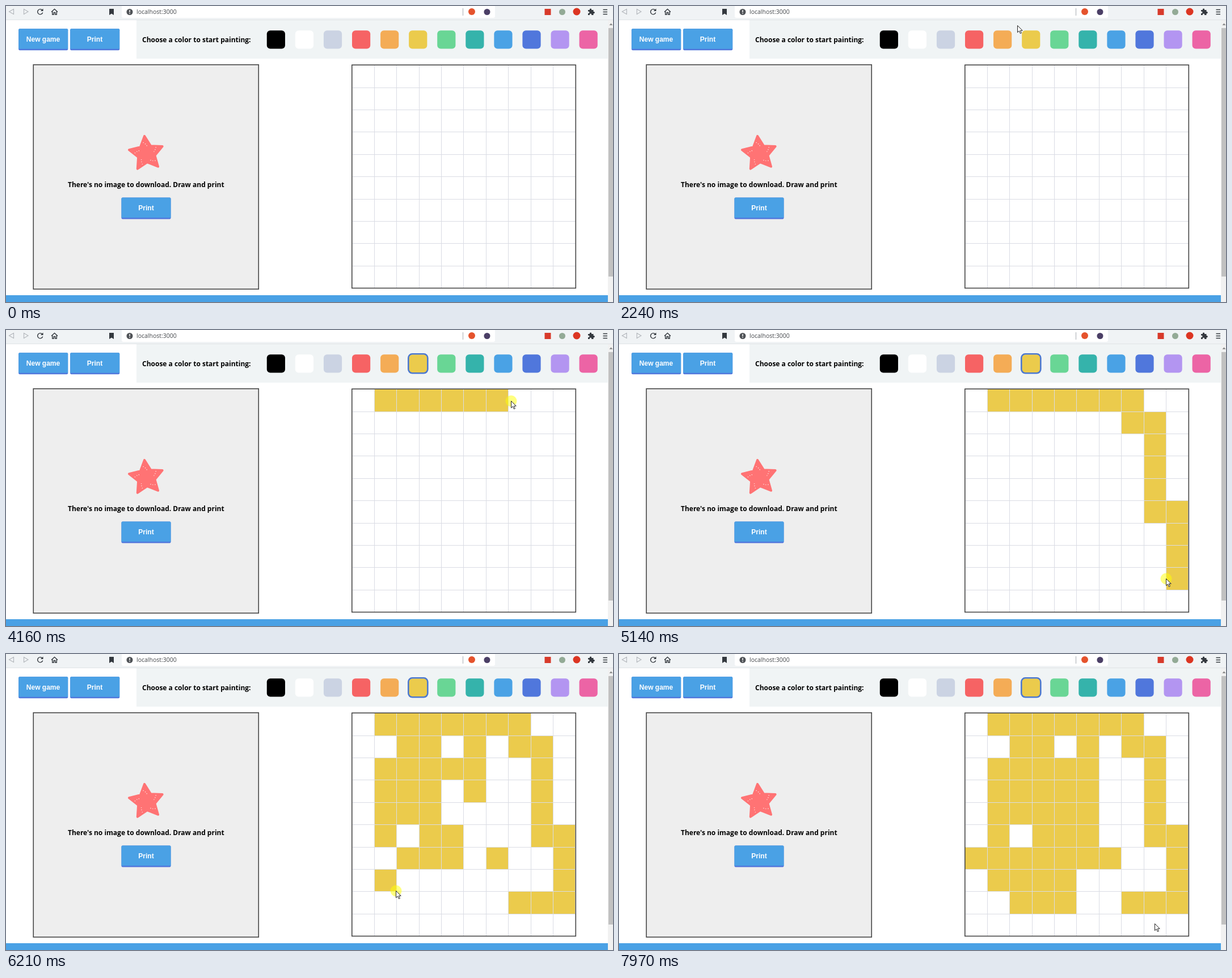
Recreate the animation shown at these times as an HTML page. Size 1070 px wide and 523 px high, loop 8 s.

```html
<!DOCTYPE html>
<html lang="en">
<head>
<meta charset="utf-8">
<title>Pixel painting</title>
<style>
  html, body { margin: 0; width: 100%; height: 100%; overflow: hidden; background: #fff; }
  svg { display: block; width: 1070px; height: 523px; }
  .label { font: 700 12px "Open Sans", sans-serif; }
  .button text { font: 700 12px "Liberation Sans", Arial, sans-serif; fill: #fff; text-anchor: middle; }
  .url { font: 10.5px "Open Sans", sans-serif; fill: #45484c; }
</style>
</head>
<body>
<svg viewBox="0 0 1070 523" xmlns="http://www.w3.org/2000/svg">
  <defs>
    <g id="key">
      <rect width="87" height="38" rx="2" fill="#5077dc"/>
      <path d="M0 35.500V2a2 2 0 0 1 2-2h83a2 2 0 0 1 2 2v33.500z" fill="#4aa1e5"/>
    </g>
  </defs>

  <!-- Browser bar -->
  <rect width="1070" height="25" fill="#f0f3f5"/>
  <rect y="24" width="1070" height="1" fill="#dfe3e6"/>
  <path d="M204 0h658v18q0 3-3 3H207q-3 0-3-3z" fill="#fff"/>
  <path d="M13.500 5.500v9L5.500 10zM31.500 5.500v9L39 10zM805.500 4v13" fill="none" stroke="#b4b8bd" stroke-width="1.200"/>
  <g fill="none" stroke="#33383e" stroke-width="1.400">
    <path d="M64 7.500A4.600 4.600 0 1 0 64.700 11.500"/>
    <path d="M80 10.500l5.500-5 5.500 5M81.700 9.500v5.500h2.600v-3.500h2.400V15h2.600V9.500"/>
    <path d="M1052.500 6.500h7.500M1052.500 10.500h7.500M1052.500 14.500h7.500"/>
  </g>
  <g fill="#33383e">
    <path d="M65.500 4.500v4.500H61z"/>
    <path d="M182 5h8v11l-4-2.500-4 2.500z"/>
    <path d="M1026 7h3a1.700 1.700 0 1 1 3 0h3.500v3a1.700 1.700 0 1 1 0 3.200V16H1032a1.700 1.700 0 1 0-3 0h-3v-3.300a1.700 1.700 0 1 0 0-3z"/>
  </g>
  <circle cx="218" cy="10.500" r="5.500" fill="#505357"/>
  <path d="M217.300 7h1.400v4.300h-1.400zM217.300 12.500h1.400v1.400h-1.400z" fill="#fff"/>
  <text class="url" x="230" y="14.300">localhost:3000</text>
  <circle cx="821" cy="10" r="6" fill="#e5532d"/>
  <circle cx="848" cy="10.500" r="5.500" fill="#4b3f66"/>
  <rect x="949.500" y="5" width="11" height="11" fill="#d83a2b"/>
  <circle cx="980.500" cy="10.500" r="5.500" fill="#93aa96"/>
  <circle cx="1006" cy="10" r="6.500" fill="#dc3522"/>

  <!-- Page -->
  <rect x="230" y="25" width="831" height="68" fill="#f0f4f5"/>
  <rect y="511" width="1061" height="12" fill="#4aa1e5"/>
  <rect x="1061" y="25" width="9" height="498" fill="#f1f1f1"/>
  <rect x="1062" y="39" width="8" height="439" fill="#c1c1c1"/>
  <path d="M1063.500 34l3-3.500 3 3.500z" fill="#8a8a8a"/>
  <g class="button">
    <use href="#key" x="22.200" y="40.200"/><text x="65.500" y="62.500">New game</text>
    <use href="#key" x="113.200" y="40.200"/><text x="156.500" y="62.500">Print</text>
  </g>
  <text class="label" x="240" y="64">Choose a color to start painting:</text>
  <g id="swatches"></g>
  <rect id="ring" x="709.300" y="42.300" width="34" height="34" rx="7" fill="none" stroke="#4c78cf" stroke-width="2.600"/>

  <!-- Print preview -->
  <rect x="48.250" y="103.750" width="397" height="396.500" fill="#eee" stroke="#464646" stroke-width="1.600"/>
  <path id="star" fill="#ff7374" stroke="#ff7374" stroke-width="4" stroke-linejoin="round"/>
  <path id="speckles" stroke="#ffe3df" stroke-width="1.400" stroke-linecap="round"/>
  <text class="label" x="246.800" y="319.500" text-anchor="middle">There's no image to download. Draw and print</text>
  <g class="button"><use href="#key" x="203.500" y="338.500"/><text x="247" y="361">Print</text></g>

  <!-- Drawing board -->
  <g id="cells" fill="#ebcb4c"></g>
  <g id="lines" fill="#dadce4"></g>
  <rect x="609.800" y="104.200" width="394.500" height="394.300" fill="none" stroke="#464646" stroke-width="1.600"/>

  <g id="pointer">
    <circle id="press" cx=".5" cy=".5" r="10" fill="#ff0" fill-opacity=".5"/>
    <path d="M.5.500v12.200l2.900-2.700 2 4.600 2-.9-2-4.400h3.800z" fill="#fff" stroke="#222"/>
  </g>
</svg>
<script>
const LOOP = 8000, START = 510, TICK = 68.4;
const CELL = 39.35, LEFT = 610.22, TOP = 104.9;
const $ = id => document.getElementById(id);
const clamp = v => Math.max(0, Math.min(1, v));
const mix = (a, b, part) => a + (b - a) * part;
const mixPoint = (a, b, part) => [mix(a[0], b[0], part), mix(a[1], b[1], part)];

function addRect(parent, attributes) {
  const rect = document.createElementNS("http://www.w3.org/2000/svg", "rect");
  for (const name in attributes) rect.setAttribute(name, attributes[name]);
  return $(parent).appendChild(rect);
}

const colors = "#000 #fff #cbd3e3 #f66364 #f4ac56 #ebcb4c #69d695 #35b3ab #4aa2e5 #5077dc #b395f1 #ec64a5";
colors.split(" ").forEach((fill, i) =>
  addRect("swatches", { x: 459.8 + 50.07 * i, y: 43.2, width: 32.2, height: 32.2, rx: 6, fill }));

// Starfish: five arms, each with a few pale speckles
const polar = (radius, degrees) => {
  const angle = degrees * Math.PI / 180;
  return [247.3 + radius * Math.cos(angle), 260.7 + radius * Math.sin(angle)];
};
let outline = [], speckles = "";
for (let arm = 0; arm < 5; arm++) {
  const angle = 72 * arm - 96;
  outline.push(polar(31, angle), polar(15.5, angle + 36));
  for (const side of [-1, 0, 1]) speckles += `M${polar(17 - 3 * side, angle + 9 * side)}h.2`;
}
$("star").setAttribute("d", `M${outline.join("L")}z`);
$("speckles").setAttribute("d", speckles);

const gridX = col => Math.floor(LEFT + CELL * col);
const gridY = row => Math.floor(TOP + CELL * row);
for (let i = 1; i < 10; i++) {
  addRect("lines", { x: gridX(i), y: 105, width: 1, height: 393 });
  addRect("lines", { x: 611, y: gridY(i), width: 393, height: 1 });
}

// The brush visits these cells (column, row); a dash means a straight run
const route = ("00-70 71-81 82-85 95-98 88-78 66 45 34-33 22-21 12-14 35-36 46 53-51 42 31-32 " +
  "23-24 15 26 17 28-38 43-44 55 16-06 27-37 48-47 56 54 33").split(" ").flatMap(run => {
    const [from, to] = run.split("-").map(cell => [+cell[0], +cell[1]]);
    if (!to) return [from];
    const steps = Math.abs(to[0] - from[0]) + Math.abs(to[1] - from[1]);
    return Array.from({ length: steps + 1 }, (_, i) => mixPoint(from, to, i / steps));
  });

// The first cell is only where the drag starts and stays white
const cells = route.slice(1).map(([col, row]) => addRect("cells", {
  x: gridX(col), y: gridY(row),
  width: gridX(col + 1) - gridX(col), height: gridY(row + 1) - gridY(row)
}));

// Brush speed: tick and number of cells travelled
const pace = [[48, 0], [53, 6.6], [60, 11.5], [67, 17.5], [76, 31.9], [90, 53], [94, 56]];
function travelled(tick) {
  let distance = 0;
  for (let i = 1; i < pace.length; i++) {
    const [t0, d0] = pace[i - 1], [t1, d1] = pace[i];
    if (tick > t0) distance = mix(d0, d1, clamp((tick - t0) / (t1 - t0)));
  }
  return distance;
}
function brushAt(distance) {
  const i = Math.floor(distance);
  const [col, row] = mixPoint(route[i], route[i + 1] || route[i], distance - i);
  return [LEFT + CELL * (col + .5), TOP + CELL * (row + .5)];
}

// Free pointer moves: first tick, last tick, destination
const approach = [[0, 5, 592, 76], [8, 11, 200, 66], [14, 18, 560, 10],
  [21, 25, 702, 34], [25, 29, 731, 58], [36, 43, 630, 125]];
const leave = [[98, 101, 884, 465], [103, 104, 888, 472], [105, 108, 958, 508], [108, 109, 944, 476]];
const glide = (start, moves, tick) => moves.reduce((point, [first, last, ...goal]) =>
  mixPoint(point, goal, clamp((tick - first) / (last - first))), start);

const show = (node, visible) => node.setAttribute("visibility", visible ? "inherit" : "hidden");

function draw(now) {
  const tick = Math.floor((now % LOOP - START) / TICK);
  const distance = travelled(tick);
  const point = tick < 48 ? glide([1061, 508], approach, tick) : glide(brushAt(distance), leave, tick);
  cells.forEach((cell, i) => show(cell, i + 1 <= distance));
  $("ring").setAttribute("opacity", clamp((tick - 31) / 3));
  $("pointer").setAttribute("transform", `translate(${point.map(Math.round)})`);
  show($("pointer"), tick >= 0 && (tick < 105 || tick >= 108));
  show($("press"), tick === 32 || tick === 33 || tick >= 46 && tick < 99);
}

function frame() {
  draw(performance.now());
  requestAnimationFrame(frame);
}
frame();
</script>
</body>
</html>
```
